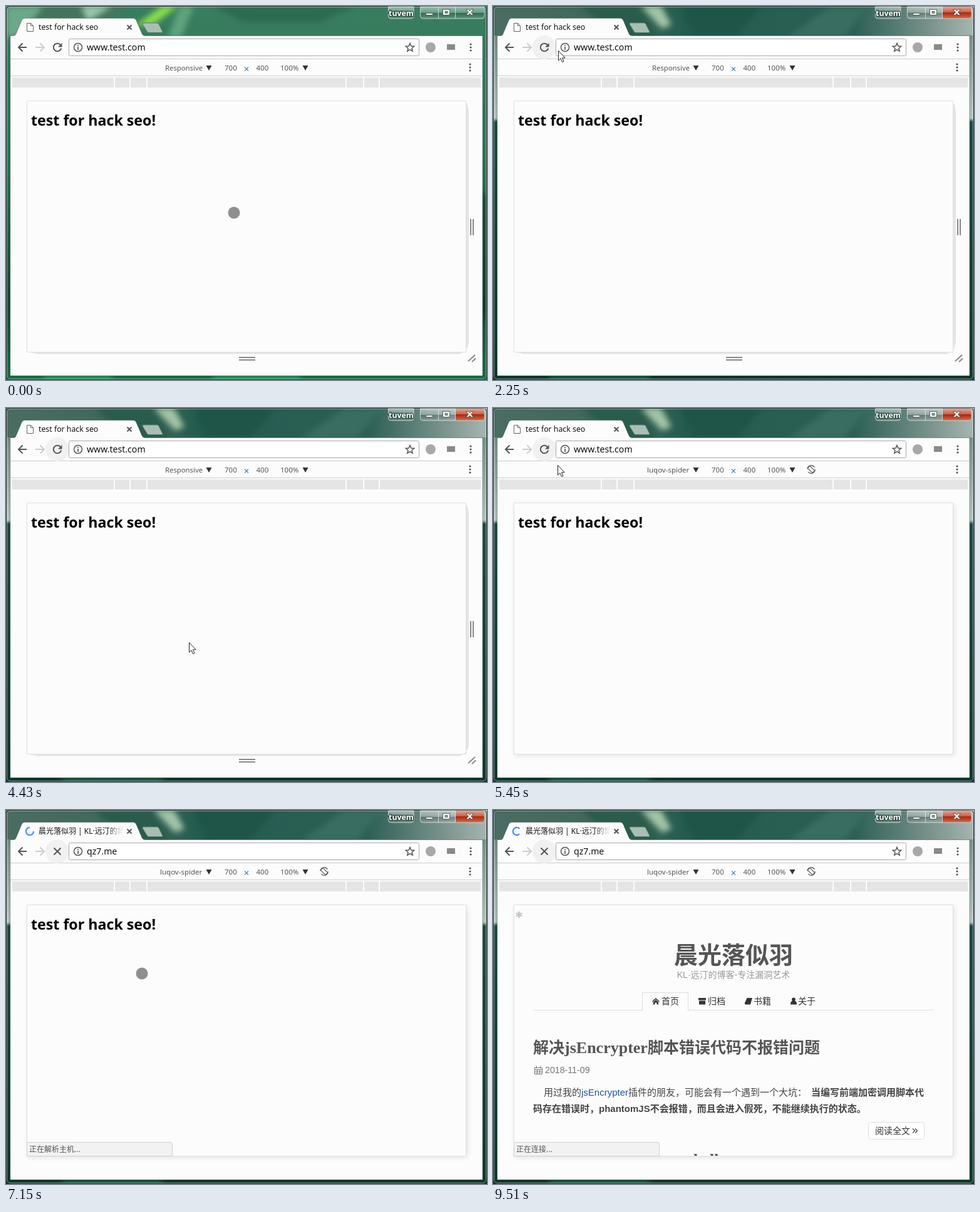
Recreate the animation shown at these times as an HTML page. Size 768 by 597 pixels, loop 9570 ms.

```html
<!DOCTYPE html>
<html lang="zh-CN">
<head>
<meta charset="utf-8">
<title>Browser demo</title>
<style>
html, body { margin: 0; width: 100%; height: 100%; overflow: hidden; background: #000; }
svg { display: block; width: 768px; height: 597px; }
text { font-family: "Noto Sans", "Noto Sans CJK SC", sans-serif; font-size: 12.3px; fill: #111; white-space: pre; }
.url { font-size: 14.1px; }
.bar { font-size: 11.5px; fill: #555; }
.line { fill: none; stroke: #555; stroke-width: 2; }
.thin { fill: none; stroke: #ccc; }
.blog text { font-family: "Liberation Sans", "Noto Sans CJK SC", sans-serif; font-size: 15px; fill: #444; }
.blog .h { font-family: "Noto Sans CJK SC", sans-serif; font-size: 25px; font-weight: 700; fill: #555; }
.blog .serif { font-family: "Liberation Serif", serif; font-size: 26px; }
.blog .nav { font-size: 14px; fill: #333; }
.soft { filter: blur(5px); }

.anim, .cursor, .spin, .row { animation: 9570ms step-end infinite; }
.active { animation-name: active; }
.hover { animation-name: hover; }
.resp { animation-name: resp; }
.spider { animation-name: spider; }
.menu { animation-name: menu; }
.row { animation-name: row; }
.idle { animation-name: idle; }
.load { animation-name: load; }
.oldname { animation-name: oldname; }
.newname { animation-name: newname; }
.status { animation-name: status; }
.resolve { animation-name: resolve; }
.connect { animation-name: connect; }
.first { animation-name: first; }
.blog { animation-name: blog; }
.arrow { animation-name: arrow; }
.dot { animation-name: dot; }
.cursor { animation-name: move; animation-timing-function: linear; }
.spin { animation-name: spin; animation-timing-function: linear; transform-origin: 38px 34px; }

@keyframes active { 0% { opacity: 0 } 10.867%, 100% { opacity: 1 } }
@keyframes hover { 0% { opacity: 0 } 15%, 100% { opacity: 1 } }
@keyframes resp { 0% { opacity: 1 } 47.126%, 100% { opacity: 0 } }
@keyframes spider { 0% { opacity: 0 } 47.126%, 100% { opacity: 1 } }
@keyframes menu { 0% { opacity: 0 } 31.139% { opacity: 1 } 46.29%, 100% { opacity: 0 } }
@keyframes idle { 0% { opacity: 1 } 65.517%, 100% { opacity: 0 } }
@keyframes load { 0% { opacity: 0 } 65.517%, 100% { opacity: 1 } }
@keyframes oldname { 0% { opacity: 1 } 67.4%, 100% { opacity: 0 } }
@keyframes newname { 0% { opacity: 0 } 67.4%, 100% { opacity: 1 } }
@keyframes status { 0% { opacity: 0 } 70.01%, 100% { opacity: 1 } }
@keyframes resolve { 0% { opacity: 1 } 80.251%, 100% { opacity: 0 } }
@keyframes connect { 0% { opacity: 0 } 80.251%, 100% { opacity: 1 } }
@keyframes first { 0% { opacity: 1 } 84.639%, 100% { opacity: 0 } }
@keyframes blog { 0% { opacity: 0 } 84.639%, 100% { opacity: 1 } }
@keyframes arrow { 0% { opacity: 0 } 2.35% { opacity: 1 } 47.126% { opacity: 0 } 55.4% { opacity: 1 } 72.95% { opacity: 0 } 95%, 100% { opacity: 1 } }
@keyframes dot { 0% { opacity: 1 } 2.35% { opacity: 0 } 47.126% { opacity: 1 } 55.4% { opacity: 0 } 72.95% { opacity: 1 } 95%, 100% { opacity: 0 } }
@keyframes row {
  0% { opacity: 0; transform: translateY(149px) }
  35.11% { opacity: 1; transform: translateY(149px) }
  35.946% { opacity: 1; transform: translateY(197px) }
  36.7% { opacity: 1; transform: translateY(221px) }
  37.3% { opacity: 1; transform: translateY(245px) }
  38% { opacity: 1; transform: translateY(269px) }
  38.6% { opacity: 1; transform: translateY(293px) }
  39.3% { opacity: 1; transform: translateY(317px) }
  40.3%, 100% { opacity: 1; transform: translateY(352px) }
}
@keyframes spin { from { transform: rotate(156.1deg) } to { transform: rotate(3259.9deg) } }
@keyframes move {
  0%, .6% { transform: translate(364px, 330px) }
  1.2% { transform: translate(277px, 264px) }
  1.8% { transform: translate(206px, 202px) }
  2.4% { transform: translate(155px, 146px) }
  3% { transform: translate(115px, 100px) }
  4.5% { transform: translate(92px, 50px) }
  7% { transform: translate(86px, 30px) }
  10.3%, 10.867% { transform: translate(84px, 27px) }
  15.778%, 23.5% { transform: translate(79px, 64px) }
  23.511%, 23.9% { transform: translate(104px, 71px) }
  25.5% { transform: translate(180px, 92px) }
  28.63%, 35.1% { transform: translate(281px, 104px) }
  35.946%, 36.4% { transform: translate(292px, 221px) }
  38% { transform: translate(292px, 290px) }
  41.17%, 47.12% { transform: translate(292px, 374px) }
  47.126%, 51.09% { transform: translate(294px, 381px) }
  52.5% { transform: translate(264px, 337px) }
  53.5% { transform: translate(219px, 275px) }
  54.5% { transform: translate(203px, 205px) }
  55.4% { transform: translate(184px, 150px) }
  56.2% { transform: translate(130px, 102px) }
  56.949%, 57.4% { transform: translate(103px, 91px) }
  60.188%, 71.5% { transform: translate(81px, 71px) }
  72% { transform: translate(104px, 91px) }
  72.9% { transform: translate(155px, 148px) }
  73.7% { transform: translate(195px, 190px) }
  74.713%, 75.1% { transform: translate(217px, 261px) }
  76.5%, 90.282% { transform: translate(219px, 273px) }
  94% { transform: translate(570px, 495px) }
  95.5% { transform: translate(690px, 580px) }
  96.5%, 100% { transform: translate(731px, 600px) }
}
</style>
</head>
<body>
<svg viewBox="0 0 768 597">
  <defs>
    <linearGradient id="green" x2="0" y2="1">
      <stop stop-color="#3a7d60"/><stop offset=".4" stop-color="#2a7552"/><stop offset=".8" stop-color="#144a34"/><stop offset="1" stop-color="#1d6e48"/>
    </linearGradient>
    <linearGradient id="side" x2="0" y2="1">
      <stop stop-color="#4c6b62"/><stop offset=".1" stop-color="#7d968d"/><stop offset=".3" stop-color="#b4c3bd"/><stop offset=".31" stop-color="#1e4a40"/><stop offset="1" stop-color="#12382c"/>
    </linearGradient>
    <linearGradient id="top">
      <stop stop-color="#4b6c62"/><stop offset=".3" stop-color="#3c665a"/><stop offset=".4" stop-color="#245c50"/><stop offset=".75" stop-color="#2c5f55"/><stop offset=".9" stop-color="#758f88"/><stop offset="1" stop-color="#a7b5b1"/>
    </linearGradient>
    <linearGradient id="shine" x2="0" y2="1">
      <stop stop-color="#fff" stop-opacity=".5"/><stop offset=".5" stop-color="#fff" stop-opacity=".25"/><stop offset=".52" stop-color="#000" stop-opacity=".12"/><stop offset="1" stop-color="#fff" stop-opacity=".2"/>
    </linearGradient>
    <linearGradient id="red" x2="0" y2="1">
      <stop stop-color="#e0a898"/><stop offset=".48" stop-color="#c4604c"/><stop offset=".52" stop-color="#a92812"/><stop offset="1" stop-color="#cf6a48"/>
    </linearGradient>
    <linearGradient id="fade"><stop stop-color="#fcfcfc" stop-opacity="0"/><stop offset="1" stop-color="#fcfcfc"/></linearGradient>
    <clipPath id="page"><path d="M34 152H735V552H34Z"/></clipPath>
    <clipPath id="title"><path d="M50 22H186V46H50Z"/></clipPath>
    <path id="down" d="M0 0H9L4.500 8Z" fill="#333"/>
    <g id="dots" fill="#555"><circle r="1.600" cy="-5"/><circle r="1.600"/><circle r="1.600" cy="5"/></g>
  </defs>

  <!-- Window glass -->
  <rect width="768" height="597" fill="url(#green)"/>
  <g class="soft">
    <path d="M0 0H60L20 50H0Z" fill="#6fa78a"/>
    <path d="M60 0H190L150 40H30Z" fill="#44755c"/>
    <path d="M120 0H170L130 25Z" fill="#9cc6ab"/>
    <path d="M205 32L250 0H275L235 30Z" fill="#8ae04a"/>
    <path d="M258 50L278 0H300L280 50Z" fill="#5fa37e"/>
    <path d="M330 0H560L500 26H380Z" fill="#2c6b50"/>
    <path d="M60 589H170V597H60ZM330 589H470V597H330Z" fill="#35a565"/>
    <path d="M761 300H768V500H761Z" fill="#0e3324"/>
  </g>
  <g class="anim active">
    <rect width="768" height="597" fill="url(#side)"/>
    <rect width="768" height="47" fill="url(#top)"/>
    <g class="soft">
      <path d="M140 0H235L262 50H200Z" fill="#2a5b4c"/>
      <path d="M236 0H268L285 30L270 36Z" fill="#a3c4a6"/>
      <path d="M300 0H430L390 48H320Z" fill="#1f5549"/>
      <path d="M470 50L540 0H600L560 50Z" fill="#396d61"/>
      <path d="M90 590H250V597H90Z" fill="#2a7050"/>
    </g>
  </g>
  <rect x=".5" y=".5" width="767" height="596" rx="6" fill="none" stroke="#0c1d17"/>
  <rect x="1.500" y="1.500" width="765" height="594" rx="5" fill="none" stroke="#fff" stroke-opacity=".5"/>

  <!-- Caption buttons -->
  <g fill="url(#shine)" stroke="#dfe9e5" stroke-opacity=".8">
    <path d="M610.500 1V16q0 4 4 4H647q4 0 4-4V1Z"/>
    <path d="M661.500 1V16q0 4 4 4H760q4 0 4-4V1ZM690.500 1V20M717.500 1V20"/>
  </g>
  <path class="anim active" d="M718 1V19.500H760q3.500 0 3.500-4V1Z" fill="url(#red)"/>
  <g fill="#fff" stroke="#3a4a45" stroke-width=".8">
    <path d="M670.500 11.500H681.500V14.500H670.500Z"/>
    <path fill-rule="evenodd" d="M697.500 5.500H708.500V14.500H697.500ZM701 8.500H705V11.500H701Z"/>
    <path d="M734.500 5.500H738L740.500 8L743 5.500H746.500L742.500 10L746.500 14.500H743L740.500 12L738 14.500H734.500L738.500 10Z"/>
  </g>
  <text x="631" y="15.500" text-anchor="middle" style="font-weight:600;fill:#fff;stroke:#2c4a40;stroke-width:2.500px;paint-order:stroke">tuvem</text>

  <!-- Tabs and toolbar -->
  <path d="M218 29q-.500-2 2-2H241q2 0 3 2L250 41q.500 1.500-1.500 1.500H228q-2 0-3-2Z" fill="#a9bfb4" stroke="#5b7c6d"/>
  <path d="M7 47.500H12q3 0 4-3L25 23q1.500-3.500 5-3.500H203q3.500 0 5 3.500L217 44q1.500 3.500 5 3.500H761V590H7Z" fill="#fcfcfc"/>
  <path d="M7 47.500H12q3 0 4-3L25 23q1.500-3.500 5-3.500H203q3.500 0 5 3.500L217 44q1.500 3.500 5 3.500H761V590.500H6.500V47" fill="none" stroke="#234a3c" stroke-opacity=".45"/>
  <path d="M193.500 30.500L200.500 37.500M200.500 30.500L193.500 37.500" class="line" stroke-width="1.500"/>
  <path d="M7 84.500H761M7 111.500H761" class="thin"/>
  <circle class="anim hover" cx="82" cy="66" r="19" fill="#f1f1f1"/>
  <rect x="100.500" y="52.500" width="559" height="27" rx="2" fill="#fff" stroke="#a9a9a9"/>
  <path class="line" d="M33 66H21M26.500 59.500L20 66L26.500 72.500"/>
  <path class="line" style="stroke:#ccc" d="M47 66H60M54.500 59.500L61 66L54.500 72.500"/>
  <circle class="line" style="stroke-width:1.500px" cx="115" cy="66" r="6.500"/>
  <path class="line" style="stroke-width:1.700px" d="M115 65V70M115 62V63.700"/>
  <path class="line" style="stroke-width:1.500px" d="M645 59.500L646.900 64L651.700 64.400L648 67.500L649.200 72.200L645 69.600L640.800 72.200L642 67.500L638.300 64.400L643.100 64Z"/>
  <circle cx="678" cy="66" r="8" fill="#a8a8a8"/>
  <rect x="704" y="61" width="13" height="9" fill="#8a8a86"/>
  <use href="#dots" x="742" y="66"/>
  <use href="#dots" x="741" y="98"/>

  <g class="anim idle">
    <path d="M33.500 27.500H39.500L43.500 31.500V40.500H33.500ZM39.500 27.500V31.500H43.500" fill="#fff" stroke="#666"/>
    <path class="line" d="M87 62A6.300 6.300 0 1 0 88.200 67.500"/>
    <path d="M89.500 59V65.500H83Z" fill="#555"/>
  </g>
  <g class="anim load">
    <path class="line" d="M76.500 60.500L87.500 71.500M87.500 60.500L76.500 71.500"/>
    <path class="spin" d="M42.300 38.300A6.100 6.100 0 1 1 42.300 29.700" fill="none" stroke="#4285f4" stroke-width="2.200"/>
  </g>
  <g class="anim oldname">
    <text x="52" y="38">test for hack seo</text>
    <text class="url" x="129" y="71">www.test.com</text>
  </g>
  <g class="anim newname">
    <text x="52" y="38" clip-path="url(#title)" style="font-size:12px">晨光落似羽 | KL·远汀的博客</text>
    <rect x="162" y="24" width="25" height="20" fill="url(#fade)"/>
    <text class="url" x="129" y="71">qz7.me</text>
  </g>

  <!-- Device bar -->
  <use href="#down" x="319.500" y="95"/>
  <use href="#down" x="473.500" y="95"/>
  <text class="bar" x="349" y="103">700</text>
  <text class="bar" x="399.500" y="103">400</text>
  <text class="bar" x="438" y="103">100%</text>
  <path d="M381 97.500L387 103.500M387 97.500L381 103.500" stroke="#4f86ad" stroke-width="1.200"/>
  <path d="M10 114H758V130H10Z" fill="#e5e5e5"/>
  <path d="M173 113V131M198 113V131M225 113V131M543 113V131M571 113V131M596 113V131" stroke="#fcfcfc" stroke-width="2"/>
  <g class="anim resp">
    <text class="bar" x="254" y="103" style="font-size:11.300px">Responsive</text>
    <path d="M735 155Q738 158 739 170V535Q738 545 735 548ZM38 553H730L724 555.500H50Z" fill="#e4e4e4"/>
    <path class="line" style="stroke:#888" d="M742 340V366M746 340V366M372 561H398M372 565H398M738 567L749 557M744 568L750 562.500"/>
  </g>
  <g class="anim spider">
    <text class="bar" x="246" y="103">luqov-spider</text>
    <g class="line" style="stroke-width:1.200px">
      <circle cx="508" cy="98" r="6.300" stroke-dasharray="15 5"/>
      <rect x="505.500" y="92.500" width="5" height="11" rx="1" transform="rotate(-45 508 98)"/>
    </g>
    <rect x="35" y="154" width="702" height="401" fill="#000" opacity=".1" style="filter:blur(4px)"/>
  </g>

  <!-- Page -->
  <rect x="33.500" y="151.500" width="701" height="401" fill="#fcfcfc" stroke="#e0e0e0"/>
  <text class="anim first" x="40" y="191" style="font-size:23.200px;font-weight:700;fill:#000">test for hack seo!</text>
  <g class="anim blog" clip-path="url(#page)">
    <path d="M41.500 161.500V172.500M36.500 164.500L46.500 169.500M46.500 164.500L36.500 169.500" stroke="#b5b5b5" stroke-width="1.300"/>
    <circle cx="41.500" cy="167" r="3.500" fill="none" stroke="#bbb"/>
    <text class="h" x="384" y="245" text-anchor="middle" style="font-size:38px">晨光落似羽</text>
    <text x="384" y="268" text-anchor="middle" style="font-size:14px;fill:#999">KL·远汀的博客-专注漏洞艺术</text>
    <path class="thin" d="M64 319.500H238.500V291.500H311.500V319.500H704" style="stroke:#ddd"/>
    <g fill="#333">
      <path d="M254 305.500L260 300L266 305.500L265 306.500L260 302L255 306.500ZM256 306.500L260 303L264 306.500V310.500H261.500V307.500H258.500V310.500H256Z"/>
      <path d="M328 300H340V303.500H328ZM329 304.500H339V310.500H329Z"/>
      <path d="M405.500 300H414L411 310.500H403Q401 309 402.500 307Z"/>
      <circle cx="480" cy="302.500" r="2.900"/>
      <path d="M475 310.500Q475 305 478 305H482Q485 305 485 310.500Z"/>
    </g>
    <text class="nav" x="269" y="310">首页</text>
    <text class="nav" x="343" y="310">归档</text>
    <text class="nav" x="416" y="310">书籍</text>
    <text class="nav" x="487" y="310">关于</text>
    <text class="h" x="64" y="388">解决<tspan class="serif">jsEncrypter</tspan>脚本错误代码不报错问题</text>
    <path d="M66.500 411.500H78.500V421.500H66.500ZM66.500 414.500H78.500M66.500 418H78.500M70.500 414.500V421.500M74.500 414.500V421.500M69.500 408.500V412.500M75.500 408.500V412.500" fill="none" stroke="#777"/>
    <text x="83" y="420" style="font-size:14.200px;fill:#777">2018-11-09</text>
    <text x="81" y="456">用过我的<tspan fill="#1f559b">jsEncrypter</tspan>插件的朋友，可能会有一个遇到一个大坑：</text>
    <text x="508" y="456" font-weight="700">当编写前端加密调用脚本代</text>
    <text x="64" y="482" font-weight="700">码存在错误时，phantomJS不会报错，而且会进入假死，不能继续执行的状态。</text>
    <rect x="599.500" y="498.500" width="89" height="27" rx="4" fill="#fff" stroke="#ddd"/>
    <text class="nav" x="610" y="517">阅读全文</text>
    <path d="M670 508.500L673.500 512L670 515.500M674 508.500L677.500 512L674 515.500" class="line" style="stroke-width:1.500px"/>
    <text class="h serif" x="310" y="566.500">shell</text>
  </g>

  <g class="anim status">
    <path d="M33.500 530.500H262q3.500 0 3.500 3.500V552.500H33.500Z" fill="#f2f2f2" stroke="#d0d0d0"/>
    <g style="font-size:12px">
      <text class="anim resolve" x="37" y="546" style="font-size:12px;fill:#555">正在解析主机...</text>
      <text class="anim connect" x="37" y="546" style="font-size:12px;fill:#555">正在连接...</text>
    </g>
  </g>

  <!-- Device menu -->
  <g class="anim menu">
    <rect x="234.500" y="111.500" width="139" height="302" fill="#fcfcfc" stroke="#b0b0b0"/>
    <rect class="row" x="235" width="138" height="24" fill="#e9e9e9"/>
    <path class="thin" style="stroke:#e0e0e0" d="M235 143.500H373M235 346.500H373M235 381.500H373"/>
    <path class="line" d="M247.500 126.500L251 130L258.500 122"/>
    <text x="271" y="131">Responsive</text>
    <text x="271" y="166">Orbeya T4</text>
    <text x="271" y="190">Tolvo 3K</text>
    <text x="271" y="214">Tolvo 7R</text>
    <text x="271" y="238">Quill 3</text>
    <text x="271" y="262">Quill 4</text>
    <text x="271" y="286">Quill 4 Max</text>
    <text x="271" y="310">Sleb</text>
    <text x="271" y="334">Sleb Max</text>
    <text x="271" y="369">luqov-spider</text>
    <text x="271" y="404">Edit...</text>
  </g>

  <g class="cursor">
    <circle class="anim dot" r="9.500" fill="#8f8f8f"/>
    <path class="anim arrow" d="M.500 .500V16L4 12.700L6.500 18.500L9 17.400L6.500 11.800H11.200Z" fill="#fff" stroke="#223"/>
  </g>
</svg>
</body>
</html>
```
